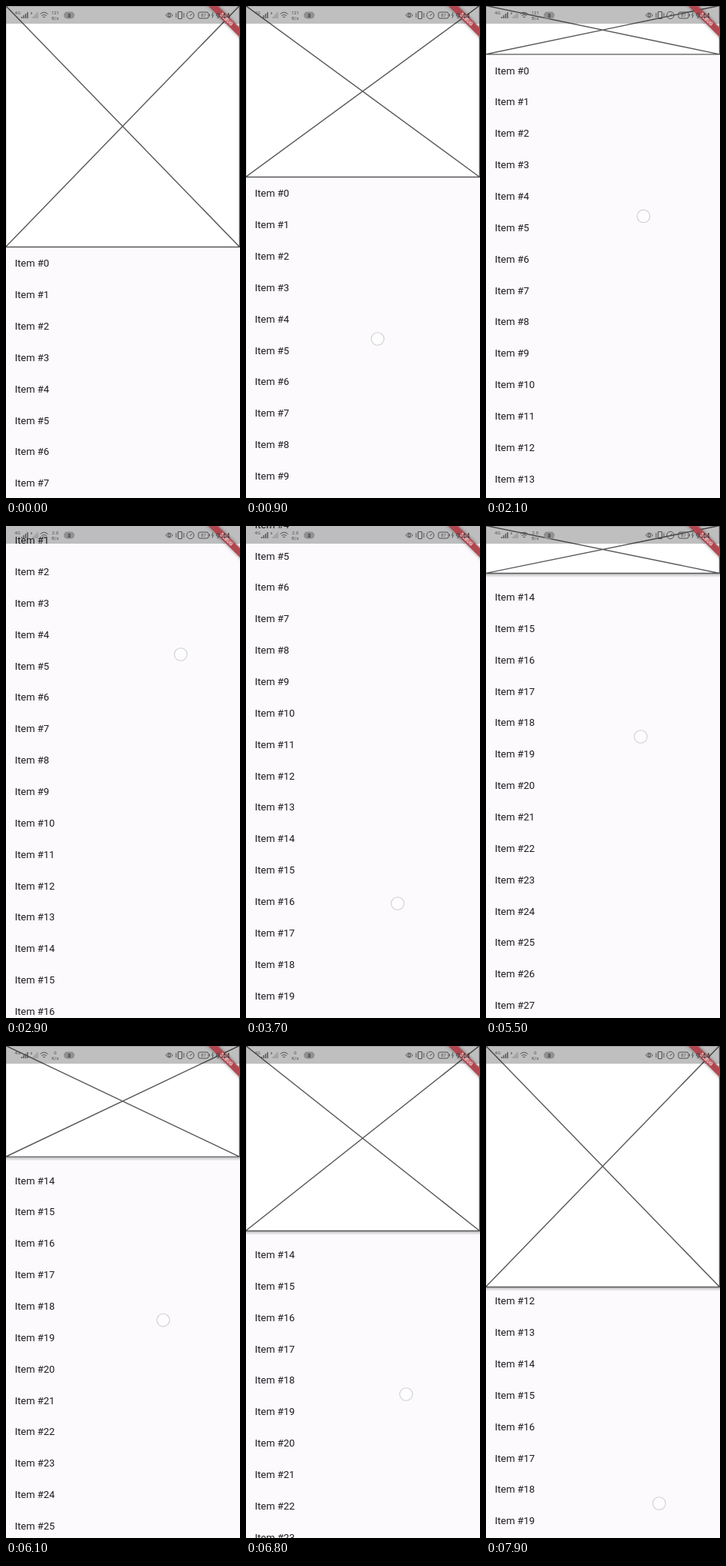
An HTML page for the animation above (8000 ms loop, 304 by 640 pixels).

```html
<!DOCTYPE html>
<html lang="en">
<head>
<meta charset="utf-8">
<title>Floating header list</title>
<style>
  html, body { margin: 0; width: 100%; height: 100%; overflow: hidden; background: #fcfafd; }
  svg { display: block; width: 304px; height: 640px; font-family: Roboto, sans-serif; }
  #list { font-size: 13px; fill: #1d1b20; }
  #frame { fill: none; stroke: #58585b; stroke-width: 1.4; }
  #touch { fill: #fff; fill-opacity: .5; stroke: #cfcdd1; stroke-width: 1.1; }
  #banner { filter: drop-shadow(0 0 2px rgba(0, 0, 0, .45)); }
  .icons { fill: none; stroke: #515153; stroke-width: 1; }
  .tiny { font-size: 6px; fill: #515153; text-anchor: middle; }
  .tiny .badge { font-size: 7px; font-weight: 700; fill: #333; }
  .tiny .clock { font-size: 9.5px; fill: #3a3a3c; }
</style>
</head>
<body>
<svg viewBox="0 0 304 640">
  <defs>
    <linearGradient id="shade" x2="0" y2="1">
      <stop stop-color="#000" stop-opacity=".24"/>
      <stop offset="1" stop-color="#000" stop-opacity="0"/>
    </linearGradient>
  </defs>
  <rect width="304" height="640" fill="#fcfafd"/>
  <g id="list"></g>
  <g id="header">
    <rect id="shadow" width="304" height="5" fill="url(#shade)"/>
    <rect id="paper" width="304" fill="#fff"/>
    <path id="frame" transform="translate(-.5 -.5)"/>
  </g>
  <circle id="touch" r="8.3"/>

  <rect width="304" height="23" fill="#000" fill-opacity=".25"/>
  <g id="banner" transform="translate(304 0) rotate(45)">
    <rect x="-42" y="20.4" width="84" height="8.6" fill="#b2464f"/>
    <text y="27" text-anchor="middle" font-size="6.4" font-weight="900" fill="#fff" fill-opacity=".75">DEBUG</text>
  </g>

  <g class="icons">
    <path id="signal" stroke-width="1.4"/>
    <path id="weakSignal" stroke="#8b8b8d"/>
    <path d="M44.5 10.5q5-4.5 10 0M46.3 12.7q3.2-3 6.4 0M48 14.8q1.5-1.4 3 0"/>
    <path d="M207.5 12q4.5-6 9 0q-4.5 6-9 0z"/>
    <circle cx="212" cy="12" r="1.6"/>
    <path d="M223.5 7.5h5v9h-5zM221 9v6M231 9v6"/>
    <circle cx="239.5" cy="12" r="4.7"/>
    <path d="M239 13l2.5-3"/>
    <rect x="250" y="8" width="13" height="8" rx="2"/>
    <path d="M264.5 10.5v3M269 8.5l-1.6 3.5h2l-1.6 3.5"/>
  </g>
  <rect x="75" y="7.5" width="14" height="9" rx="4.5" fill="#909092"/>
  <g class="tiny">
    <text x="15" y="10.5">4G</text>
    <text x="33" y="10.5">x</text>
    <text id="speed" x="64" y="10.5"></text>
    <text id="unit" x="64" y="17.5"></text>
    <text x="82" y="14.6" class="badge">3</text>
    <text x="256.5" y="14.3">87</text>
    <text x="282" y="15.6" class="clock">9:44</text>
  </g>
</svg>
<script>
const LOOP = 8000, STEP = 100;
const ROW = 40.86, FULL = 314, LEAD = 21;  // row pitch, open header, header to first row
const SLOP = 16, GLIDE = 500;              // px before a drag takes hold, ms of fling decay
const SPEEDS = ["121 B/s", "2.0 B/s", "0 K/s"];
const $ = id => document.getElementById(id);

// Finger strokes as [ms, x, y]; all scrolling follows from them
const drags = [
  [[100, 158, 540], [900, 171, 433], [2900, 227, 167]],
  [[3100, 187, 628], [3700, 197, 491], [4500, 216, 211]],
  [[4900, 198, 196], [5500, 201, 274], [6800, 208, 453], [7900, 225, 595]]
];

function fingerAt(drag, t) {
  const next = drag.findIndex(k => k[0] > t);
  if (next === 0) return drag[0];
  const b = drag.at(next), a = drag.at(next < 0 ? -2 : next - 1);
  const p = Math.min(1, (t - a[0]) / (b[0] - a[0]));
  return b.map((v, i) => a[i] + (v - a[i]) * p);
}

// Distance the list has moved because of one drag and the fling after it
function travel(i, t) {
  const drag = drags[i], end = drag.at(-1), prev = drag.at(-2);
  const reach = fingerAt(drag, t)[2] - drag[0][2];
  const pulled = Math.sign(reach) * Math.max(0, Math.abs(reach) - SLOP);
  const stop = i + 1 < drags.length ? drags[i + 1][0][0] : LOOP;
  const glide = Math.max(0, Math.min(t, stop) - end[0]);
  const speed = (end[2] - prev[2]) / (end[0] - prev[0]);
  return pulled + speed * GLIDE * (1 - Math.exp(-glide / GLIDE));
}

function bars(x, gap) {
  return [2, 4, 6, 8].map((h, i) => `M${x + i * gap} 16v-${h}`).join("");
}

for (let i = 0; i < 32; i++) {
  const row = document.createElementNS("http://www.w3.org/2000/svg", "text");
  row.setAttribute("x", 11.5);
  row.setAttribute("y", i * ROW + 4.2);
  row.textContent = "Item #" + i;
  $("list").append(row);
}
$("signal").setAttribute("d", bars(20.5, 2.5));
$("weakSignal").setAttribute("d", bars(35, 2));

function show(id, on) {
  $(id).style.display = on ? "" : "none";
}

function drawHeader(h, floating) {
  show("header", h > 0);
  show("shadow", floating);
  $("shadow").setAttribute("y", h);
  $("paper").setAttribute("height", h);
  $("frame").setAttribute("d", `M0 0H304V${h}H0ZL304 ${h}M304 0L0 ${h}`);
}

function drawTouch(t) {
  const drag = drags.find(d => t >= d[0][0] && t <= d.at(-1)[0]);
  show("touch", drag);
  if (!drag) return;
  const [, x, y] = fingerAt(drag, t);
  $("touch").setAttribute("cx", x);
  $("touch").setAttribute("cy", y);
}

function draw(now) {
  const t = Math.floor(now % LOOP / STEP) * STEP;
  let y = FULL + LEAD, h = FULL;
  drags.forEach((_, i) => {
    const move = travel(i, t);
    y += move;
    h = Math.max(0, Math.min(FULL, h + move));
  });
  $("list").setAttribute("transform", `translate(0 ${y})`);
  drawHeader(h, h > y - LEAD + 1);
  drawTouch(t);
  const [speed, unit] = SPEEDS[Math.floor(t / 2900)].split(" ");
  $("speed").textContent = speed;
  $("unit").textContent = unit;
}

const start = performance.now();
function tick() {
  draw(performance.now() - start);
  requestAnimationFrame(tick);
}
tick();
</script>
</body>
</html>
```
